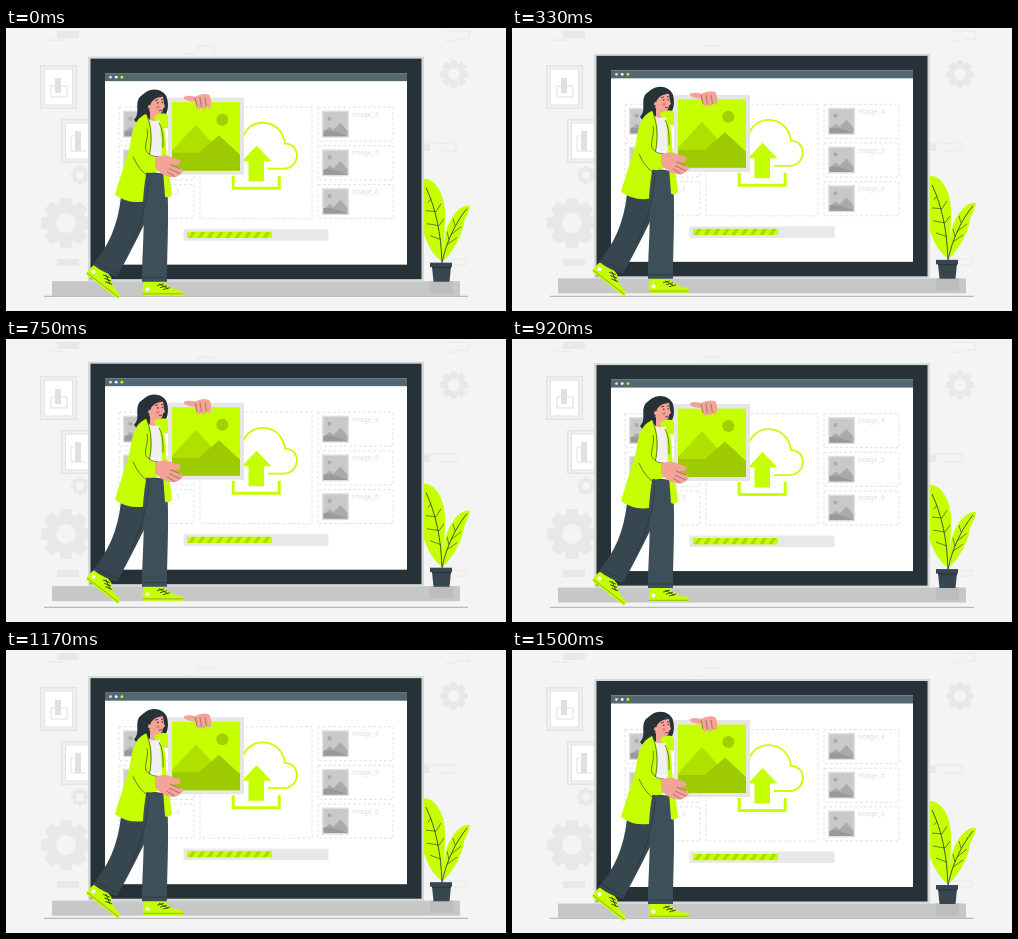
An HTML page with a canvas that plays this animation: 500 px wide and 283 px high, repeating every 1.54 s.

```html
<!DOCTYPE html>
<html lang="en">
<head>
<meta charset="utf-8">
<title>Image upload</title>
<style>
  html, body { margin: 0; width: 100%; height: 100%; overflow: hidden; background: #f4f4f4; }
  canvas { display: block; width: 500px; height: 283px; }
</style>
</head>
<body>
<canvas id="stage" width="500" height="283"></canvas>
<script>
const ctx = document.getElementById('stage').getContext('2d');
const LIME = '#c6ff00', DARK = '#263238', SLATE = '#37474f', SKIN = '#f4a397',
      PAPER = '#f4f4f4', FAINT = '#e8e8e8';
const FRAMES = 37, FPS = 24, RISE = 6.5;

function rect(x, y, w, h, color) {
  ctx.fillStyle = color;
  ctx.fillRect(x, y, w, h);
}

function disc(x, y, r, color) {
  ctx.fillStyle = color;
  ctx.beginPath();
  ctx.arc(x, y, r, 0, Math.PI * 2);
  ctx.fill();
}

function shape(d, color) {
  ctx.fillStyle = color;
  ctx.fill(new Path2D(d));
}

function line(d, color = DARK, width = 0.7) {
  ctx.strokeStyle = color;
  ctx.lineWidth = width;
  ctx.stroke(new Path2D(d));
}

function gear(x, y, r, hole) {
  ctx.save();
  ctx.translate(x, y);
  disc(0, 0, r * 0.78, FAINT);
  for (let i = 0; i < 8; i++) {
    shape(`M${-r * 0.2} ${-r} H${r * 0.2} L${r * 0.28} ${-r * 0.7} H${-r * 0.28}Z`, FAINT);
    ctx.rotate(Math.PI / 4);
  }
  disc(0, 0, hole, PAPER);
  ctx.restore();
}

function wallFrame(x, y) {
  rect(x, y, 37, 44, '#e4e4e4');
  rect(x + 1.5, y + 1.5, 34, 41, '#f1f1f1');
  rect(x + 4, y + 3.5, 29, 37, '#e2e2e2');
  rect(x + 5, y + 4.5, 27, 35, '#fff');
}

function background() {
  rect(0, 0, 500, 283, PAPER);
  wallFrame(34, 37);
  rect(49, 50, 6, 15, '#e0e0e0');
  line('M49 58H45V69H61V58H55', '#dedede', 1);
  wallFrame(55, 91);
  rect(69, 103, 6, 20, '#e0e0e0');
  line('M68 108H65V123H80', '#e0e0e0', 1);
  gear(60, 195, 25, 10);
  gear(74, 147, 9, 4);
  gear(448, 46, 14, 6);
  rect(51, 3, 22, 7, FAINT);
  rect(51, 231, 22, 7, FAINT);
  line('M40 12H60M192 25V18H208V25M179 26H192M440 3H463V11H452M439 13H449', FAINT, 1);
  line('M418 115H436M433 115H450V123H433M438 231H460V237H448', FAINT, 1);
  rect(416, 116, 8, 7, FAINT);
  line('M38 268.3H462', '#777', 0.6);
}

function plant() {
  shape('M436 234C420 222 414 198 411 170C412 156 416 151 420 151C435 154 440 177 439 189C439 207 437 222 436 234Z', LIME);
  shape('M437 234C437 213 439 201 446 190C452 181 458 177 464 178C463 185 460 189 458 194C457 207 447 224 437 234Z', LIME);
  line('M420 160C430 181 435 206 436 235C440 215 450 194 461 181', DARK, 0.8);
  line('M425 171L422 175M430 184L420 183M433 198L421 196M435 212L424 208M430 184L435 176M433 198L438 191', DARK, 0.6);
  line('M441 217L451 210M445 207L455 199M443 212L441 204M449 198L447 191', DARK, 0.6);
  shape('M426 239H445L443.5 254H427.5Z', SLATE);
  rect(424, 235, 22, 4.5, SLATE);
  rect(426, 239.3, 19, 1.2, DARK);
}

function thumbnail(x, y) {
  rect(x, y, 27, 27, '#dedede');
  rect(x + 1.5, y + 1.5, 24, 24, '#c9c9c9');
  disc(x + 7.5, y + 8, 2, '#aaa');
  shape(`M${x + 1.5} ${y + 22}l6-6 4 3 7-7 7 8v5.5h-24Z`, '#aaa');
  shape(`M${x + 1.5} ${y + 20}q10-1 24 5.5h-24Z`, '#999');
}

function dashedBox(x, y, w, h) {
  ctx.setLineDash([3, 2]);
  ctx.strokeStyle = '#dcdcdc';
  ctx.lineWidth = 0.8;
  ctx.strokeRect(x, y, w, h);
  ctx.setLineDash([]);
}

function fileCard(x, row, label) {
  const y = 79.5 + row * 38.7;
  dashedBox(x, y, 75, 34);
  thumbnail(x + 4, y + 3.5);
  ctx.font = '7px Roboto, sans-serif';
  ctx.fillStyle = '#dedede';
  ctx.fillText(label, x + 34, y + 9.5);
}

function progressBar() {
  rect(177.5, 201.5, 145, 11.5, '#e8e8e8');
  rect(181, 204, 85, 6.3, LIME);
  ctx.save();
  ctx.beginPath();
  ctx.rect(181, 204, 85, 6.3);
  ctx.clip();
  for (let x = 182; x < 266; x += 9.3) {
    shape(`M${x} 210.3l4-6.3h4l-4 6.3Z`, '#a9dc00');
  }
  ctx.restore();
}

function monitor() {
  rect(82, 29, 336, 225, '#d5d9d8');
  rect(84.5, 31, 331, 220.5, DARK);
  rect(99, 45.5, 302, 191.5, '#fff');
  rect(99, 45.5, 302, 8, '#546872');
  ['#ddd', '#fff', LIME].forEach((color, i) => disc(104.5 + i * 5.7, 49.5, 1.4, color));

  for (let row = 0; row < 3; row++) {
    fileCard(113, row, 'Image_' + (row + 1));
    fileCard(312, row, 'Image_' + (row + 4));
  }
  dashedBox(194, 79.5, 112, 111.5);
  progressBar();

  line('M236 114C239 88 276 89 279 116C295 116 295 140 278 141H262', LIME, 1.8);
  shape('M250.5 118L265.5 133.5H258V153.5H242.5V133.5H236Z', LIME);
  line('M227.2 148V160.5H273.2V148', LIME, 3);
}

function shoe(x, y, angle) {
  ctx.save();
  ctx.translate(x, y);
  ctx.rotate(angle);
  shape('M1 0Q12-2 22 1Q27 8 38 9Q41 11 40 14H0Q-1 7 1 0Z', LIME);
  line('M0 12.2H40', '#718d16', 0.6);
  line('M14 4l7-2M17 6l7-2M20 8l7-2M16 2l9 5', DARK, 0.8);
  disc(4.5, 7.5, 2, '#fff');
  ctx.restore();
}

function legs() {
  shoe(88.5, 235.5, 0.66);
  shoe(137, 254, 0);
  shape('M137 143L158 146C149 178 128 218 111 249Q97 245 87 237C102 219 112 198 115 169Z', SLATE);
  shape('M136 146H160C164 177 161 221 161 254H136C136 223 140 195 136 146Z', '#3d4f58');
  line('M143 151C141 178 134 198 124 219M137 250H161M89 234Q100 241 112 246', DARK, 0.6);
}

function picture() {
  rect(162, 70, 76, 77, '#e6e6e6');
  rect(166, 74.5, 68, 68.5, LIME);
  disc(216.3, 92, 6, '#a2cf00');
  shape('M166 123L190 97L216 126H166Z', '#afe000');
  shape('M166 125H193L213 107.5L234 127V143H166Z', '#9dca00');
}

function head() {
  shape('M139 65C147 59 158 62 161 70C163 77 162 88 157 88L142 94C137 98 131 97 128 92C135 86 128 76 134 69Z', DARK);
  shape('M144 81V92Q148 98 155 92L152 85Z', SKIN);
  shape('M144 69Q153 66 157 69L158 76L159 79L157 81Q156 88 151 87Q143 86 141 79Z', SKIN);
  shape('M138 73Q146 63 157 69Q149 69 145 75L143 84Z', DARK);
  disc(144, 79, 2, SKIN);
  disc(152, 79.5, 1.8, '#ec8077');
  disc(151.8, 75.2, 0.8, DARK);
  disc(156.2, 74.8, 0.7, DARK);
  line('M149 73l3-1M155 72l2 0M153 83l3-0.6', DARK, 0.8);
}

function torso() {
  shape('M148 88Q159 83 163 88V101L151 99Z', LIME);
  shape('M142 91Q148 95 154 92L159 123L139 125Z', '#f0f0f0');
  shape('M154 93Q160 99 160 122L166 167Q163 171 159 169L156 129Z', LIME);
  shape('M140 86C129 91 126 102 124 118C119 136 113 153 109 167Q121 176 137 174C138 157 140 146 144 126C148 111 146 95 140 86Z', LIME);
  line('M141 88C147 103 146 121 140 142M153 95Q158 104 157 120', DARK, 0.6);
}

function lowerArm() {
  shape('M133 95C124 109 124 127 129 136Q139 150 153 143L152 129Q143 129 140 123L144 105Z', LIME);
  line('M141 101C143 110 138 117 140 123Q144 129 152 129M127 129Q133 143 143 149', DARK, 0.6);
  shape('M149 130Q157 126 164 129L173 132Q176 134 173 137L166 137L176 141Q178 144 175 146Q170 151 163 149Q155 147 149 140Z', SKIN);
  line('M164 137L174 141M163 141L174 146M161 144L169 149', '#5b3f3d', 0.5);
}

function upperHand() {
  shape('M178 69Q183 67 189 69Q196 65 203 67Q206 71 205 78Q203 82 201 79L200 75L200 80Q198 83 196 80L195 76V80Q193 83 191 80L189 74Q182 74 178 71Z', SKIN);
  line('M189 70L191 79M194 70L195.5 80M199 70L200.5 79', '#5b3f3d', 0.5);
}

function woman() {
  legs();
  head();
  torso();
  picture();
  lowerArm();
  upperHand();
}

function draw(now) {
  const step = Math.floor((now + 5) * FPS / 1000) % FRAMES;
  const phase = ((step + 1) % FRAMES) / FRAMES;
  const lift = RISE * (1 - Math.abs(1 - 2 * phase));

  background();
  ctx.save();
  ctx.translate(0, -lift);
  rect(46, 253.5, 408, 15, '#c7c7c7');
  rect(424, 253.5, 23, 12, '#bdbdbd');
  plant();
  monitor();
  woman();
  ctx.restore();
}

function tick() {
  draw(performance.now() % 1540);
  requestAnimationFrame(tick);
}
tick();
</script>
</body>
</html>
```
